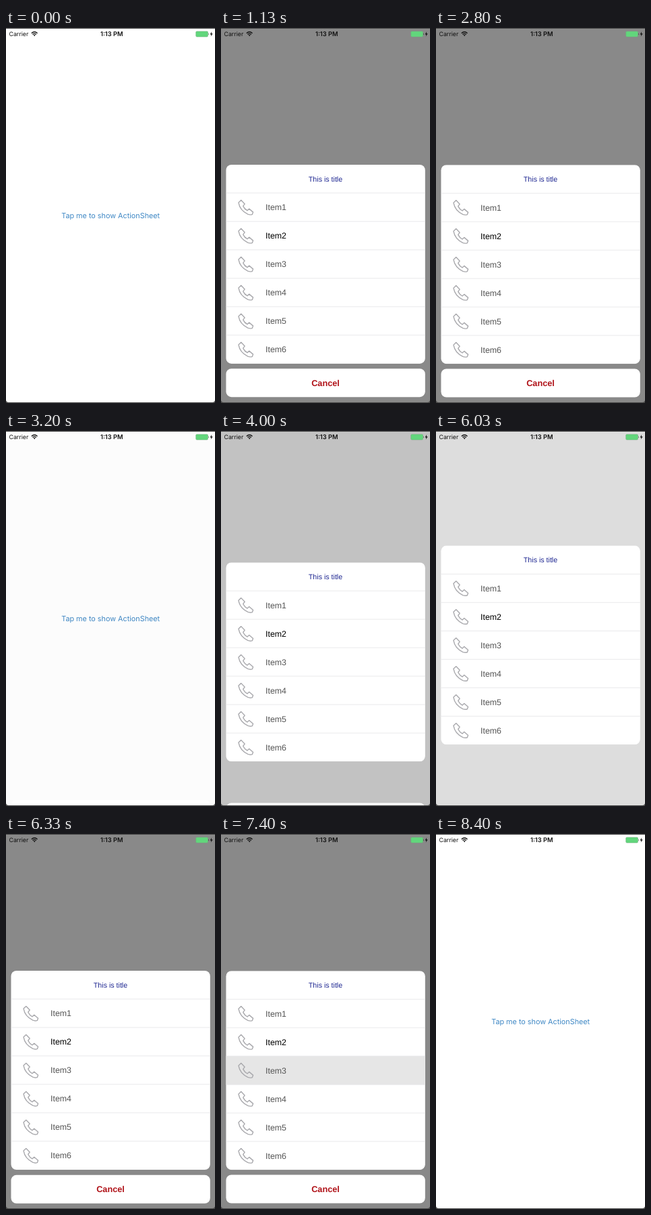
Recreate the animation shown at these times as an HTML page. Size 310 by 554 pixels, loop 8430 ms.

```html
<!DOCTYPE html>
<html lang="en">
<head>
<meta charset="utf-8">
<title>Action sheet</title>
<style>
html, body { margin: 0; width: 100%; height: 100%; overflow: hidden; background: #fff; }
svg { display: block; width: 100vw; height: 100vh; }
text { text-rendering: geometricPrecision; }
.ui { font-family: Inter, Roboto, sans-serif; }
.sheet { font-family: "Liberation Sans", Arial, sans-serif; }
</style>
</head>
<body>
<svg viewBox="0 0 310 554" preserveAspectRatio="none">
  <defs>
    <clipPath id="card"><rect x="7.5" width="295.3" height="294" rx="8"/></clipPath>
    <path id="phone" d="M29.8 10.4 L35.2 16 L32.8 19.2 Q34.8 23.6 39 25.8 L41.8 23.2 L47.6 28.2 L46.4 31.4 Q43.4 32.6 39.8 31.2 Q28 25.6 26 14 Z"
      fill="none" stroke="#a9a9ad" stroke-width="1.4" stroke-linejoin="round"/>
  </defs>
  <rect width="310" height="554" fill="#fff"/>
  <text id="button" class="ui" x="155.2" y="281" font-size="10.8" text-anchor="middle" fill="#3f88c5">Tap me to show ActionSheet</text>
  <rect id="dim" width="310" height="554" fill="#000"/>
  <g id="list" class="sheet"></g>
  <g id="cancel" class="sheet">
    <rect id="cancelBox" x="7.5" width="295.3" height="42" rx="8"/>
    <text id="cancelText" x="155" y="25.4" font-size="12.7" font-weight="700" text-anchor="middle">Cancel</text>
  </g>
  <g class="ui" fill="#111">
    <text x="4.5" y="12" font-size="8.8">Carrier</text>
    <text x="156.8" y="12" font-size="9.3" font-weight="600" text-anchor="middle">1:13 PM</text>
    <g fill="none" stroke="#111" stroke-width="1.3">
      <path d="M37.8 7.7 Q42.2 3.9 46.6 7.7"/>
      <path d="M39.5 9.5 Q42.2 7.2 44.9 9.5"/>
    </g>
    <path d="M40.7 10.6 Q42.2 9.5 43.7 10.6 L42.2 12.2 Z"/>
    <rect x="281.7" y="4.9" width="17.8" height="8.1" rx="1.4" fill="#62d67c" stroke="#6fa97b" stroke-width=".5"/>
    <path d="M300 7.5 Q301.3 9 300 10.5 Z"/>
    <path d="M305.2 5.2 L302.6 9.4 L304.4 9.4 L303.8 12.6 L306.7 8.2 L304.8 8.2 Z"/>
  </g>
  <rect width="310" height="1" fill="#444"/>
  <path d="M0 549 Q0 553 4 553 H306 Q310 553 310 549 V554 H0 Z" fill="#444"/>
</svg>
<script>
const LOOP = 8430, TOP = 202.2, CANCEL_TOP = 503.5, BOTTOM = 554, ROW = 42;
// press: touch lands, fade: time to dim the label, show / hide: sheet starts moving
const RUNS = [
  { press: 490, fade: 80, show: 720, hide: 2930 },
  { press: 3490, fade: 140, show: 3797, hide: 5200 },
  { press: 5520, fade: 180, show: 5890, hide: 7480 }
];
const SHOW_TIME = 400, HIDE_TIME = 300, CANCEL_DELAY = 188;
const $ = id => document.getElementById(id);

function buildList() {
  let s = `<g clip-path="url(#card)"><rect width="310" height="294" fill="#fff"/>`;
  s += `<rect id="pick" x="7" y="${3 * ROW}" width="296" height="${ROW}" fill="#e6e6e6"/>`;
  s += `<text x="155" y="24.8" font-size="10.65" text-anchor="middle" fill="#1c2590">This is title</text>`;
  for (let i = 1; i <= 6; i++) {
    s += `<g transform="translate(0 ${i * ROW})">
      <rect x="7" y="-.5" width="296" height=".8" fill="#e4e4e6"/>
      <use href="#phone"/>
      <text x="66" y="25.4" font-size="12.4" fill="${i === 2 ? "#000" : "#555"}">Item${i}</text></g>`;
  }
  $("list").innerHTML = s + "</g>";
}

const clamp = x => Math.min(1, Math.max(0, x));
const ease = x => { x = clamp(x); return x * x * (3 - 2 * x); };
const mix = (a, b, p) => a + (b - a) * p;

// Underdamped spring from 0 to 1, damping ratio 0.6
function spring(ms) {
  if (ms <= 0) return 0;
  const s = ms / 1000, decay = 17.3, freq = 23;
  return 1 - Math.exp(-decay * s) * (Math.cos(freq * s) + decay / freq * Math.sin(freq * s));
}

function draw(t) {
  let listY = BOTTOM, cancelY = BOTTOM, shade = 0, label = 1;
  for (const r of RUNS) {
    if (t < r.press || t > r.hide + HIDE_TIME) continue;
    const out = ease((t - r.hide) / HIDE_TIME);
    const age = t - r.show;
    listY = mix(mix(BOTTOM, TOP, spring(age)), BOTTOM, out);
    cancelY = mix(mix(BOTTOM, CANCEL_TOP, spring(age - CANCEL_DELAY)), BOTTOM, out);
    shade = ease(age / SHOW_TIME) * (1 - out);
    label = 1 - 0.8 * clamp((t - r.press) / r.fade) * (1 - ease(age / 400));
  }
  $("list").setAttribute("transform", `translate(0 ${listY.toFixed(2)})`);
  $("cancel").setAttribute("transform", `translate(0 ${cancelY.toFixed(2)})`);
  $("dim").setAttribute("opacity", (0.463 * shade).toFixed(4));
  $("button").setAttribute("opacity", label.toFixed(3));
  const held = t >= 5110 && t < 5220;
  $("cancelBox").setAttribute("fill", held ? "#e6e6e6" : "#fff");
  $("cancelText").setAttribute("fill", held ? "#c40d18" : "#b01218");
  $("pick").setAttribute("opacity", t >= 7360 && t < 7800 ? 1 : 0);
}

buildList();
draw(0);
const start = performance.now();
function tick() {
  draw((performance.now() - start) % LOOP);
  requestAnimationFrame(tick);
}
requestAnimationFrame(tick);
</script>
</body>
</html>
```
